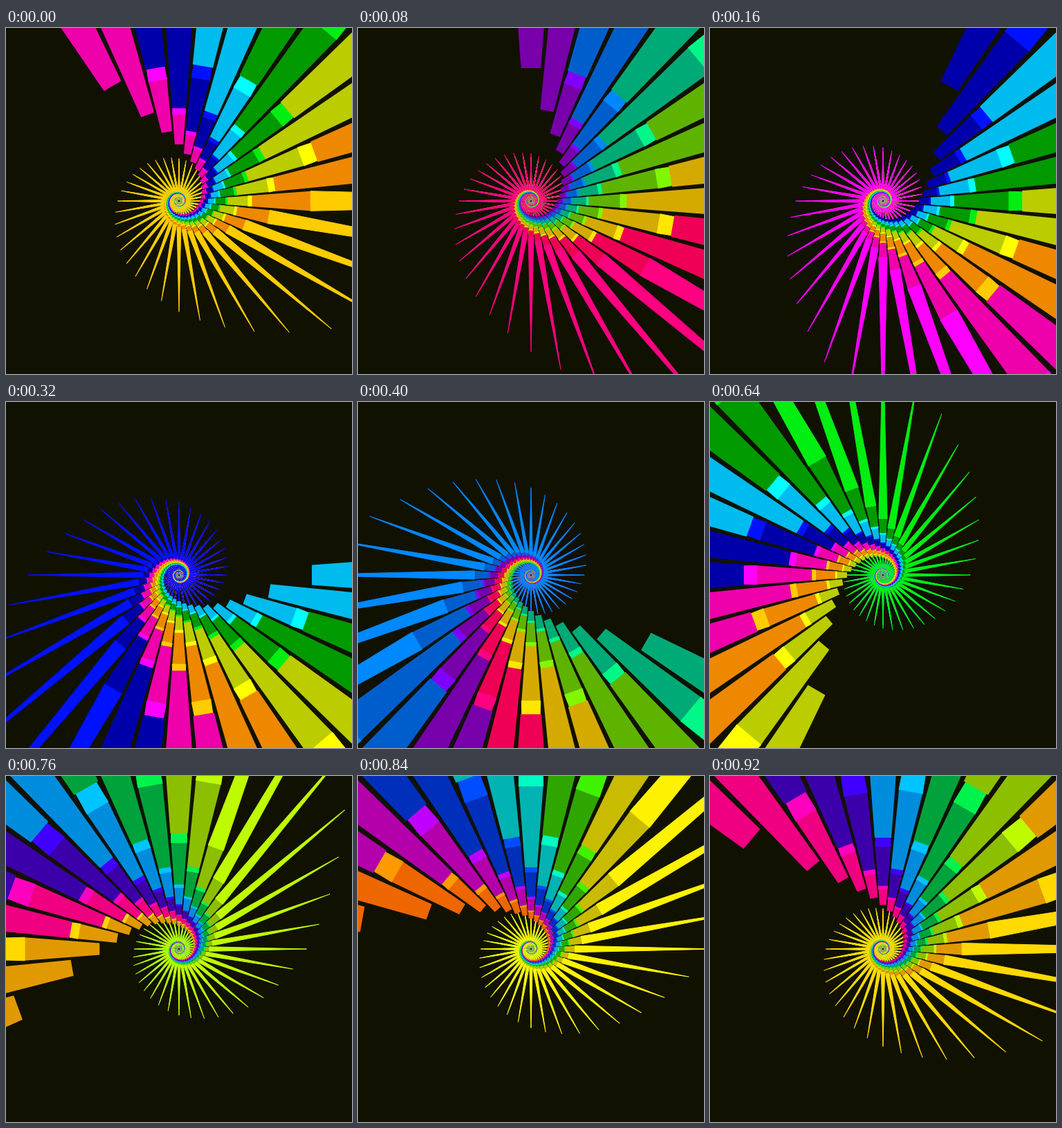
Animation, 500 px wide and 500 px high, one loop 0.96 s. Source, as an HTML page with a canvas:

```html
<!DOCTYPE html>
<html lang="en">
<head>
<meta charset="utf-8">
<title>Spiral of spokes</title>
<style>
  html, body { margin: 0; width: 100%; height: 100%; overflow: hidden; background: #110; }
  canvas { display: block; width: 500px; height: 500px; }
</style>
</head>
<body>
<canvas id="stage" width="500" height="500"></canvas>
<script>
const ctx = document.getElementById('stage').getContext('2d');

const LOOP = 960, STEP = 40;
const SPOKES = 36, BANDS = 6, TURNS = 6;
const RADIUS = 428;         // projected radius of a bar at depth 1
const TIP_RADIUS = 1798;    // projected radius of a spike's point at depth 1
const HALF_WIDTH = 0.075;   // half the bar width relative to its radius
const BODY = 1.81, GAP = 0.224;
const START = 5.23;         // depth of the upright bar at time 0
const NEAR = 0.3;

const BODY_WHEEL = ['#e0a', '#00a', '#0be', '#090', '#bc0', '#e80'];
const SPIKE_WHEEL = ['#f0f', '#01f', '#0ff', '#0e1', '#ff0', '#fc0'];

const channels = hex => [...hex.slice(1)].map(digit => parseInt(digit, 16) * 17);

// Blend neighbours on a wheel; dropping the weakest channel keeps the blend vivid.
function wheelColor(wheel, position) {
  const i = Math.floor(position), f = position - i;
  if (f === 0) return wheel[i % BANDS];
  const a = channels(wheel[i % BANDS]);
  const b = channels(wheel[(i + 1) % BANDS]);
  const rgb = a.map((v, n) => Math.round(v + (b[n] - v) * f));
  rgb[rgb.indexOf(Math.min(...rgb))] = 0;
  return `rgb(${rgb})`;
}

// A piece of a spoke pointing up, between two distances from the centre.
function piece(inner, outer, outerHalf, color) {
  const innerHalf = inner * HALF_WIDTH;
  ctx.fillStyle = color;
  ctx.beginPath();
  ctx.moveTo(-innerHalf, -inner);
  ctx.lineTo(-outerHalf, -outer);
  ctx.lineTo(outerHalf, -outer);
  ctx.lineTo(innerHalf, -inner);
  ctx.closePath();
  ctx.fill();
}

function drawBar(depth, colors) {
  colors.forEach((color, band) => {
    const back = depth - band * (BODY + GAP);
    if (back <= NEAR) return;
    const front = back - BODY;
    const outer = RADIUS / Math.max(front, NEAR);
    piece(RADIUS / back, outer, outer * HALF_WIDTH, color.body);
    if (front > NEAR) {
      piece(outer, TIP_RADIUS / front, 0, color.spike);
      ctx.strokeStyle = color.spike;
      ctx.stroke();
    }
  });
}

function draw(time) {
  const tick = Math.floor((time % LOOP) / STEP);
  const colors = Array.from({ length: BANDS }, (_, band) => ({
    body: wheelColor(BODY_WHEEL, band + tick / 4),
    spike: wheelColor(SPIKE_WHEEL, band + tick / 4)
  }));

  ctx.setTransform(1, 0, 0, 1, 0, 0);
  ctx.fillStyle = '#110';
  ctx.fillRect(0, 0, 500, 500);
  ctx.lineWidth = 1;
  ctx.lineJoin = 'bevel';

  for (let k = 0; k < SPOKES; k++) {
    const shift = k + START - 1.5 * tick;
    const nearest = ((shift % SPOKES) + SPOKES) % SPOKES;
    ctx.setTransform(1, 0, 0, 1, 250, 250);
    ctx.rotate(k * Math.PI * 2 / SPOKES);
    for (let turn = TURNS; turn >= 0; turn--) {
      drawBar(nearest + turn * SPOKES, colors);
    }
  }
}

const began = performance.now();
function frame() {
  draw(performance.now() - began);
  requestAnimationFrame(frame);
}
frame();
</script>
</body>
</html>
```
